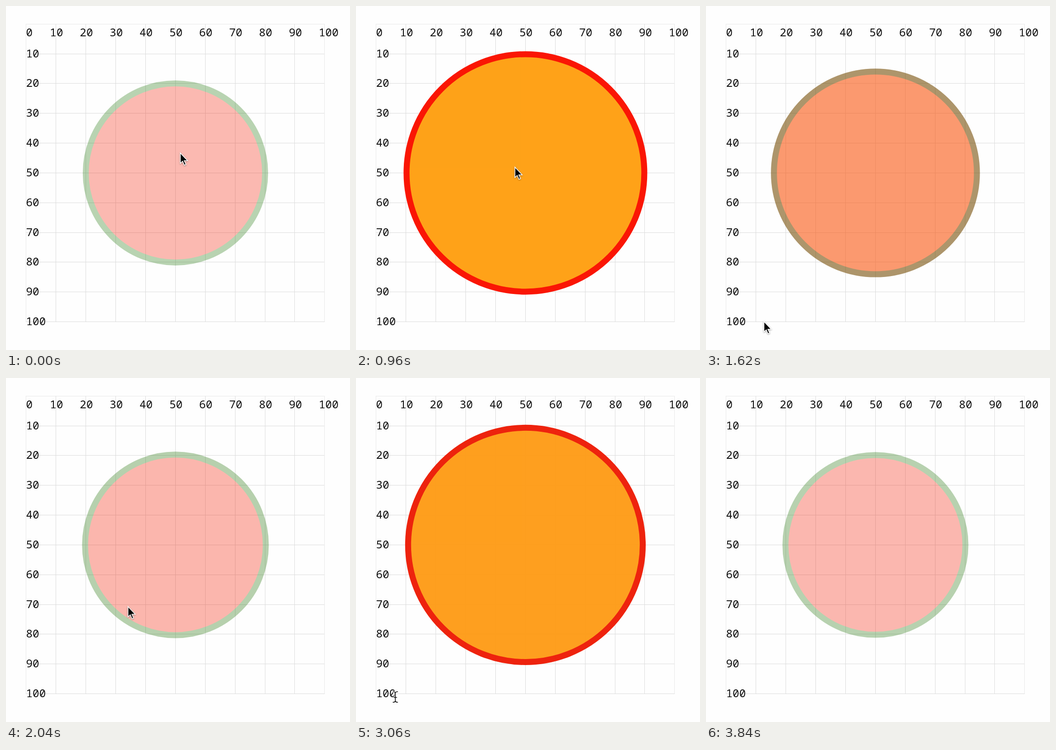
Recreate the animation shown at these times as an HTML page. Size 748 by 749 pixels, loop 3.9 s.

```html
<!DOCTYPE html>
<html lang="en">
<head>
<meta charset="utf-8">
<title>Circle hover transition</title>
<style>
  html, body { margin: 0; width: 100%; height: 100%; overflow: hidden; background: #fefefe; }
  svg { display: block; width: 748px; height: 749px; }
  text { font: 24px "Noto Sans Mono", "DejaVu Sans Mono", monospace; fill: #111; }
  .grid line { stroke: #dcdcdc; shape-rendering: crispEdges; }
  .grid .edge { stroke: #e9e9e9; }

  .disc {
    stroke-width: 13px;
    animation: hover 3.9s infinite;
  }
  @keyframes hover {
    0%, 5.26% { r: 195px; fill: rgb(247,26,0); stroke: rgb(22,112,0); opacity: .3; animation-timing-function: ease; }
    29.36%    { r: 260px; fill: rgb(255,164,20); stroke: rgb(255,16,0); opacity: 1; }
    33.33%    { r: 260px; fill: rgb(255,164,20); stroke: rgb(255,16,0); opacity: 1; animation-timing-function: cubic-bezier(.28,.093,.307,.856); }
    52.31%    { r: 196.5px; fill: rgb(247,29,0); stroke: rgb(27,110,0); opacity: .316; animation-timing-function: ease; }
    75.9%     { r: 260px; fill: rgb(255,164,20); stroke: rgb(255,16,0); opacity: 1; }
    76.26%    { r: 260px; fill: rgb(255,164,20); stroke: rgb(255,16,0); opacity: 1; animation-timing-function: cubic-bezier(.261,.097,.27,.941); }
    100%      { r: 195.2px; fill: rgb(247,26,0); stroke: rgb(22,112,0); opacity: .302; }
  }

  .pointer { animation: travel 3.9s infinite ease-in-out; }
  @keyframes travel {
    0%     { transform: translate(379px, 320px); }
    16.92% { transform: translate(354px, 331px); }
    26.15% { transform: translate(345px, 352px); animation-timing-function: ease-in; }
    32.3%  { transform: translate(218px, 578px); animation-timing-function: ease-out; }
    35.38% { transform: translate(126px, 685px); }
    42.3%  { transform: translate(126px, 687px); animation-timing-function: ease-in; }
    52.31% { transform: translate(265px, 498px); animation-timing-function: ease-out; }
    66.15% { transform: translate(334px, 352px); }
    70%    { transform: translate(326px, 370px); animation-timing-function: ease-in; }
    75.7%  { transform: translate(200px, 568px); animation-timing-function: ease-out; }
    78.46%, 84% { transform: translate(85px, 694px); }
    88%, 100% { transform: translate(78px, 722px); }
  }
  .arrow { animation: arrow 3.9s infinite step-end; }
  @keyframes arrow {
    0% { opacity: 1; }
    78% { opacity: 0; }
    85.5% { opacity: 1; }
    89.2%, 100% { opacity: 0; }
  }
  .beam { opacity: 0; animation: beam 3.9s infinite step-end; }
  @keyframes beam {
    0% { opacity: 0; }
    78% { opacity: 1; }
    85.5%, 100% { opacity: 0; }
  }
  .arrow path { fill: #000; stroke: #fff; stroke-width: 1.6; filter: drop-shadow(0 1.5px 1.5px rgba(0,0,0,.4)); }
  .beam path { fill: none; stroke-linecap: round; }
</style>
</head>
<body>
<svg viewBox="0 0 748 749">
  <g class="grid" id="grid"></g>
  <g id="labels"></g>
  <circle class="disc" cx="368.4" cy="363.4" r="195"/>
  <g class="pointer">
    <g class="arrow"><path d="M0 0V22.5L5 18L8.8 26.5L12.3 25L8.6 16.8H15.8Z"/></g>
    <g class="beam">
      <path stroke="#fff" stroke-width="4" d="M-4.5-11Q0-11 .5-8Q1-11 5.5-11M.5-8V9M-4.5 12Q0 12 .5 9Q1 12 5.5 12M-2.5 1.5H3.5"/>
      <path stroke="#111" stroke-width="1.7" d="M-4.5-11Q0-11 .5-8Q1-11 5.5-11M.5-8V9M-4.5 12Q0 12 .5 9Q1 12 5.5 12M-2.5 1.5H3.5"/>
    </g>
  </g>
</svg>
<script>
  const left = 43.4, top0 = 39.3, stepX = 64.95, stepY = 64.83;
  const add = (parent, tag, attrs, text = '') => {
    const node = document.createElementNS('http://www.w3.org/2000/svg', tag);
    for (const key in attrs) node.setAttribute(key, attrs[key]);
    node.textContent = text;
    document.getElementById(parent).append(node);
  };
  const snap = v => Math.floor(v) + 0.5;

  for (let i = 0; i <= 10; i++) {
    const x = snap(left + i * stepX), y = snap(top0 + i * stepY);
    add('grid', 'line', { x1: x, x2: x, y1: 39, y2: 688, class: i % 10 ? '' : 'edge' });
    add('grid', 'line', { y1: y, y2: y, x1: 43, x2: 693, class: i ? '' : 'edge' });
    add('labels', 'text', { x: i ? left + i * stepX - 13 : left, y: 65.5 }, i * 10);
    if (i) add('labels', 'text', { x: left, y: top0 + i * stepY + 7.5 }, i * 10);
  }
</script>
</body>
</html>
```
